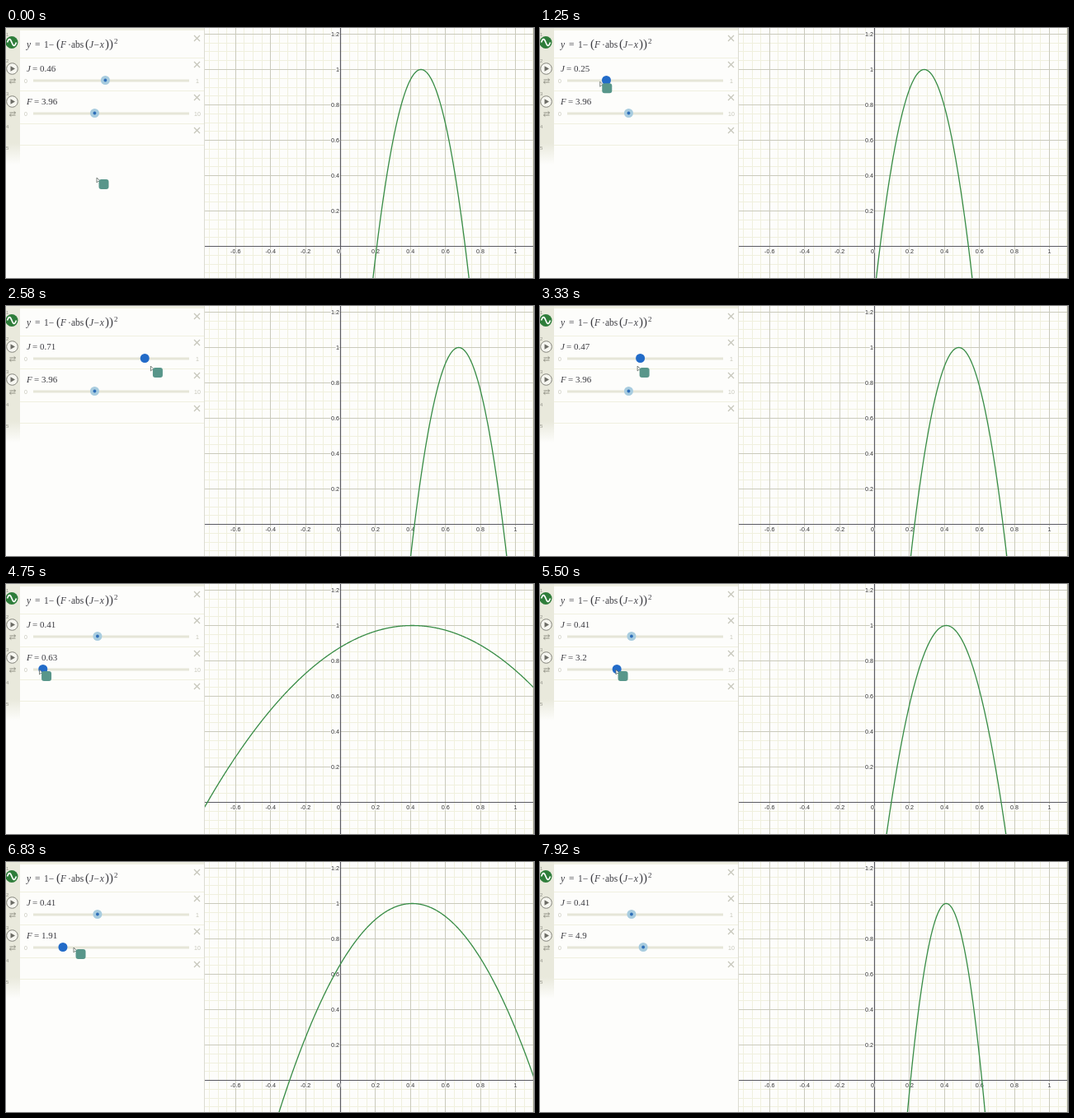
An HTML page with a canvas that plays this animation: 640 px wide and 304 px high, repeating every 8.66 s.

```html
<!DOCTYPE html>
<html lang="en">
<head>
<meta charset="utf-8">
<title>Parabola sliders</title>
<style>
  html, body { margin: 0; width: 100%; height: 100%; overflow: hidden; background: #fdfdfb; }
  canvas { display: block; }
</style>
</head>
<body>
<canvas id="stage" width="640" height="304"></canvas>
<script>
const ctx = document.getElementById('stage').getContext('2d');
const LOOP = 8660, STEP = 1000 / 12, TAU = Math.PI * 2;
const SERIF = '"Liberation Serif", "Noto Serif", serif';
const SANS = '"Liberation Sans", Roboto, sans-serif';
const PAPER = '#fdfdfb', FAINT = '#c6c6ba', INK = '#3c3c42', GREEN = '#388c46';
const ORIGIN = { x: 405.5, y: 265.5 }, UNIT = { x: 212, y: 215 };

// Turning points of each slider drag: [time in ms, value]
const J_TURNS = [[1000, .46], [1400, .156], [1830, .62], [2250, .345], [2700, .78], [3550, .41]];
const F_TURNS = [[4333, 3.96], [4860, .243], [5500, 3.2], [5900, .8], [6450, 2.78], [6660, .2], [7080, 4.9]];

const mix = (a, b, u) => a + (b - a) * u;
const span = (t, from, to) => Math.min(1, Math.max(0, (t - from) / (to - from)));
const ease = (t, from, to) => (1 - Math.cos(Math.PI * span(t, from, to))) / 2;

function swing(turns, t) {
  let value = turns[0][1];
  for (let i = 1; i < turns.length; i++) {
    value = mix(value, turns[i][1], ease(t, turns[i - 1][0], turns[i][0]));
  }
  return value;
}

const valueJ = t => swing(J_TURNS, t);
const valueF = t => swing(F_TURNS, t);
const knobJ = v => 33 + v * 190;
const knobF = v => 33 + v * 18.8;

function rect(x, y, w, h, fill) {
  ctx.fillStyle = fill;
  ctx.fillRect(x, y, w, h);
}

function line(points, color, width = 1) {
  ctx.beginPath();
  points.forEach(([x, y]) => ctx.lineTo(x, y));
  ctx.strokeStyle = color;
  ctx.lineWidth = width;
  ctx.stroke();
}

function shape(points, fill) {
  ctx.beginPath();
  points.forEach(([x, y]) => ctx.lineTo(x, y));
  ctx.fillStyle = fill;
  ctx.fill();
}

function disc(x, y, r, fill, stroke = fill) {
  ctx.beginPath();
  ctx.arc(x, y, r, 0, TAU);
  ctx.fillStyle = fill;
  ctx.fill();
  if (stroke === fill) return;
  ctx.strokeStyle = stroke;
  ctx.lineWidth = 1;
  ctx.stroke();
}

function text(s, x, y, font, color = INK, align = 'left') {
  ctx.font = font;
  ctx.fillStyle = color;
  ctx.textAlign = align;
  ctx.fillText(s, x, y);
}

function gridLines(step, color) {
  for (let i = -80; i <= 110; i += step) {
    const x = Math.floor(ORIGIN.x + i / 100 * UNIT.x) + .5;
    if (x > 241) line([[x, 0], [x, 304]], color);
  }
  for (let i = -20; i <= 125; i += step) {
    const y = Math.floor(ORIGIN.y - i / 100 * UNIT.y) + .5;
    line([[241, y], [640, y]], color);
  }
}

function label(tenths, x, y, align) {
  const font = ctx.font = `7.2px ${SANS}`;
  ctx.textAlign = align;
  ctx.lineWidth = 2;
  ctx.strokeStyle = PAPER;
  ctx.strokeText(tenths / 10, x, y);
  text(tenths / 10, x, y, font, '#333', align);
}

function drawGraph(J, F) {
  rect(240, 0, 400, 304, PAPER);
  gridLines(5, '#f0f0de');
  gridLines(20, '#cacabc');
  line([[ORIGIN.x, 0], [ORIGIN.x, 304]], '#5a5a62', 1.2);
  line([[240, ORIGIN.y], [640, ORIGIN.y]], '#5a5a62', 1.2);
  for (let i = -6; i <= 10; i += 2) {
    label(i, i ? ORIGIN.x + i / 10 * UNIT.x : 403, 273.5, 'center');
  }
  for (let i = 2; i <= 12; i += 2) {
    label(i, 404, ORIGIN.y - i / 10 * UNIT.y + 2.5, 'right');
  }
  const curve = [];
  for (let px = 240; px <= 640; px += .5) {
    const x = (px - ORIGIN.x) / UNIT.x;
    curve.push([px, ORIGIN.y - UNIT.y * (1 - (F * Math.abs(J - x)) ** 2)]);
  }
  line(curve, GREEN, 1.3);
  line([[639.5, 0], [639.5, 304]], '#9a9a94');
  line([[240.5, 0], [240.5, 304]], '#dcdcd2');
}

function drawFormula() {
  const italic = `italic 11.5px ${SERIF}`, plain = `11.5px ${SERIF}`, tall = `15px ${SERIF}`;
  const write = (s, x, font) => text(s, x, 23.5, font);
  write('y', 25, italic);
  write('=', 35, plain);
  write('1−', 46, plain);
  write('(', 61, tall);
  write('F', 66, italic);
  write('·', 75, plain);
  write('abs', 79, plain);
  write('(', 96, tall);
  write('J−x', 101, italic);
  write('))', 120, tall);
  text('2', 131, 18.5, `9px ${SERIF}`);
}

function drawSlider(name, value, top, max, knob, active) {
  const y = top + 14;
  const valueX = name === 'F' ? 34 : 32;
  text(name, 25, top + 3.5, `italic 11px ${SERIF}`);
  text('= ' + Math.round(value * 100) / 100, valueX, top + 3.5, `11px ${SERIF}`);
  rect(33, y - 1, 189, 3, '#e6e6d8');
  text('0', 24, y + 3, `7px ${SANS}`, FAINT, 'center');
  text(max, 232, y + 3, `7px ${SANS}`, FAINT, 'center');
  disc(knob, y, 5.5, active ? '#226bc8' : '#a8ccdf');
  if (!active) disc(knob, y, 1.9, '#2f6fb8');

  disc(7.5, top, 6.8, '#f6f6f0', '#85857c');
  shape([[5.5, top - 3.2], [5.5, top + 3.2], [11, top]], '#6c6c66');
  for (const dir of [1, -1]) {
    const ay = y + 1 - dir * 1.5, tail = 8 + dir * 1.7;
    line([[4.5, ay], [11.5, ay]], '#88887c', .9);
    line([[tail, ay - 1.6], [tail + dir * 1.8, ay], [tail, ay + 1.6]], '#88887c', .9);
  }
}

function drawPanel(J, F, t) {
  rect(0, 0, 240, 304, PAPER);
  rect(0, 0, 240, 3, '#efefe2');
  const fade = ctx.createLinearGradient(0, 140, 0, 166);
  fade.addColorStop(0, '#e9e9dc');
  fade.addColorStop(1, PAPER);
  rect(0, 0, 17, 166, fade);
  [4, 36, 76, 116, 142].forEach((y, row) => {
    if (row) line([[17, y + .5], [240, y + .5]], '#f0f0e0');
    text(row + 1, 0, y + 6, `6px ${SANS}`, '#94948a');
    if (row === 4) return;
    const mid = y + 8.5;
    line([[228, mid - 3.5], [235, mid + 3.5]], FAINT, 1.2);
    line([[235, mid - 3.5], [228, mid + 3.5]], FAINT, 1.2);
  });

  disc(7, 17.5, 7.5, '#2e7d3a');
  const wave = [];
  for (let x = 1.5; x <= 12.5; x += .5) wave.push([x, 17.5 - 4 * Math.sin((x - 1.5) / 11 * TAU)]);
  line(wave, '#fff', 1.7);

  drawFormula();
  drawSlider('J', J, 49.5, '1', knobJ(J), t >= 749 && t < 4080);
  drawSlider('F', F, 89.5, '10', knobF(F), t >= 4160 && t < 7160);
}

function drawPointer(t) {
  if (t >= 7910) return;
  // Rest, J slider, F slider, then away; it runs slightly ahead of a dragged knob.
  const toJ = ease(t, 170, 750), toF = ease(t, 3920, 4167), away = ease(t, 7083, 7583);
  let x = mix(110, knobJ(valueJ(t + 40)), toJ) + 18 * Math.sin(Math.PI * toJ);
  x = mix(mix(x, knobF(valueF(t + 40)), toF), 592, away);
  let y = mix(182, 63 + 10 * span(t, 1000, 2100), toJ);
  y = mix(mix(y, 104, toF), 291, away);

  const arrow = [[x, y], [x, y + 6], [x + 1.6, y + 4.5], [x + 4.2, y + 4.3], [x, y]];
  shape(arrow, '#fff');
  line(arrow, '#5c6660', .8);
  ctx.beginPath();
  ctx.roundRect(x + 2.5, y + 2, 12, 12, 3);
  ctx.fillStyle = '#58968a';
  ctx.fill();
}

function frame(now) {
  const t = Math.floor((now % LOOP) / STEP + .05) * STEP;
  // The plot trails the sliders a little.
  drawGraph(valueJ(t - 30), valueF(t - 30));
  drawPanel(valueJ(t), valueF(t), t);
  drawPointer(t);
}

const start = performance.now();
function tick() {
  frame(performance.now() - start);
  requestAnimationFrame(tick);
}
tick();
</script>
</body>
</html>
```
